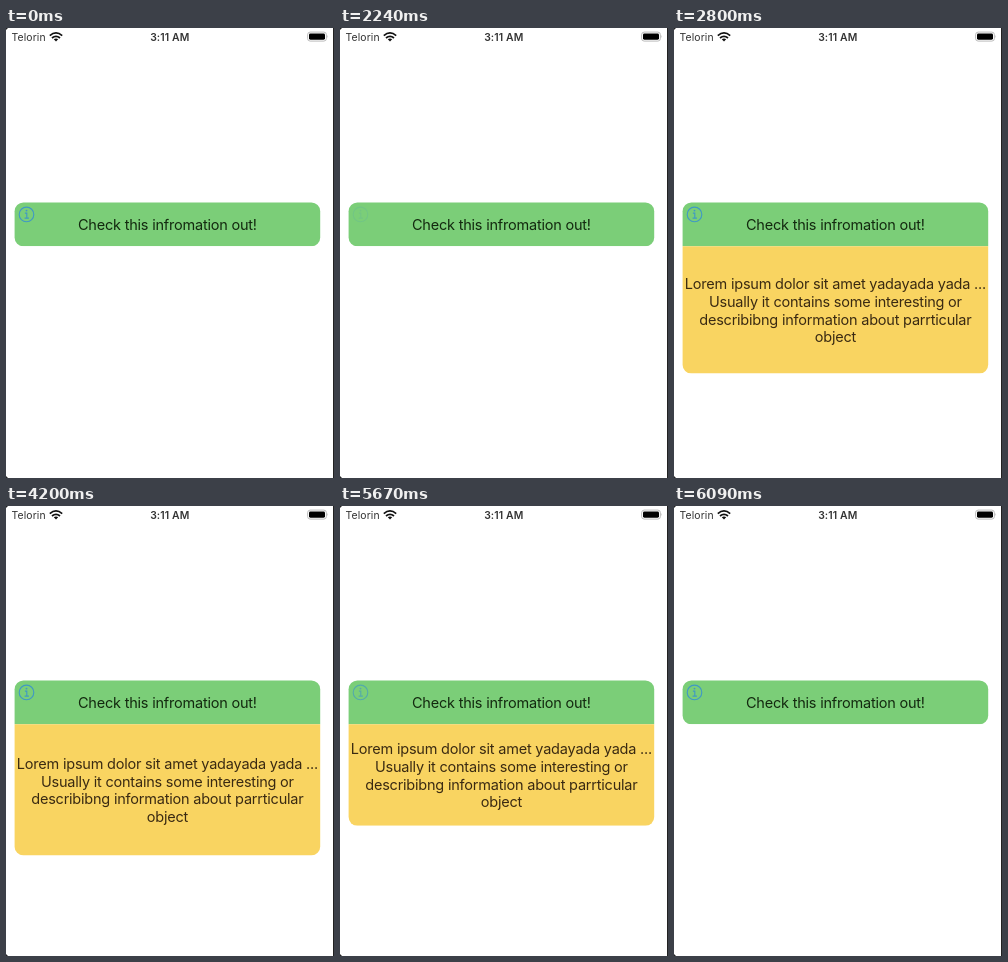
These frames come from a looping animation (328 by 450 pixels, 7.21 s). An HTML page:

```html
<!DOCTYPE html>
<html lang="en">
<head>
<meta charset="utf-8">
<title>Expandable info card</title>
<style>
  html, body { margin: 0; width: 100%; height: 100%; overflow: hidden; background: #fff; }
  svg { display: block; width: 328px; height: 450px; }
  text { font-family: Inter, "Noto Sans", sans-serif; }
  .copy { font-size: 14.5px; letter-spacing: -.21px; text-anchor: middle; fill: #13290f; }
  #details { fill: #3a2a12; }
  .status { font-size: 10.4px; letter-spacing: .12px; fill: #333; }
</style>
</head>
<body>
<svg viewBox="0 0 328 450">
  <defs>
    <clipPath id="cardClip"><rect id="cardShape" x="8.6" y="174.5" width="305.6" rx="8.75"/></clipPath>
    <clipPath id="panelClip"><rect id="panelShape" x="8" y="218.2" width="307"/></clipPath>
  </defs>

  <!-- screen edge -->
  <path d="M327.5 0V450" stroke="#222"/>
  <path d="M0 0h2L0 2zM0 450v-2l2 2z" fill="#222"/>

  <!-- status bar -->
  <text class="status" x="5.5" y="12.7">Telorin</text>
  <g fill="none" stroke="#111" stroke-width="1.7">
    <path d="M43.8 7.6Q50 2.2 56.2 7.6M46 10Q50 6.6 54 10"/>
    <path d="M47.8 11.3Q50 9.7 52.2 11.3L50 13.6z" fill="#111" stroke="none"/>
  </g>
  <text class="status" x="163.8" y="12.7" text-anchor="middle" font-weight="600">3:11 AM</text>
  <rect x="301.6" y="4.1" width="18.8" height="9" rx="2.6" fill="none" stroke="#b4b4b4" stroke-width=".9"/>
  <rect x="303" y="5.5" width="16" height="6.2" rx="1.4" fill="#000"/>
  <path d="M321.5 7.1q1.3 1.5 0 3z" fill="#b4b4b4"/>

  <!-- card -->
  <g clip-path="url(#cardClip)">
    <rect x="8" y="174" width="307" height="44.2" fill="#7bce78"/>
    <g clip-path="url(#panelClip)">
      <rect x="8" y="218" width="307" height="132" fill="#f9d461"/>
      <g id="details">
        <text class="copy" style="fill: inherit" x="161.4" y="-20.7">Lorem ipsum dolor sit amet yadayada yada ...</text>
        <text class="copy" style="fill: inherit" x="161.4" y="-3">Usually it contains some interesting or</text>
        <text class="copy" style="fill: inherit" x="161.4" y="14.7">describibng information about parrticular</text>
        <text class="copy" style="fill: inherit" x="161.4" y="32.4">object</text>
      </g>
    </g>
  </g>
  <text class="copy" x="161.4" y="202">Check this infromation out!</text>
  <g id="icon" fill="none" stroke="#4099c4" stroke-width="1.1">
    <circle cx="20.5" cy="186.4" r="7.3"/>
    <path d="M18.9 185.1h1.9v5M18.6 190.1h4.3"/>
    <circle cx="20.5" cy="182.6" r=".95" fill="#4099c4" stroke="none"/>
  </g>
</svg>
<script>
const LOOP = 7210, STEP = 70;
const HEADER_HEIGHT = 43.7, PANEL_TOP = 218.2, PANEL_HEIGHT = 131.2;
const OPEN = { press: 2240, start: 2400, duration: 456 };
const CLOSE = { press: 5320, start: 5486, duration: 560 };
const DIM = 0.15, FADE = 330;
const byId = id => document.getElementById(id);

// cubic-bezier(.42, 0, .58, 1), solved by bisection
function easeInOut(x) {
  if (x <= 0) return 0;
  if (x >= 1) return 1;
  let low = 0, high = 1;
  for (let i = 0; i < 20; i++) {
    const s = (low + high) / 2, r = 1 - s;
    if (1.26 * s * r * r + 1.74 * s * s * r + s ** 3 < x) low = s;
    else high = s;
  }
  return low * low * (3 - 2 * low);
}

const progress = (time, move) => easeInOut((time - move.start) / move.duration);

function iconOpacity(time) {
  const tap = time >= CLOSE.press ? CLOSE : OPEN;
  if (time < tap.press) return 1;
  return DIM + (1 - DIM) * easeInOut((time - tap.start) / FADE);
}

function draw(time) {
  const height = PANEL_HEIGHT * (progress(time, OPEN) - progress(time, CLOSE));
  byId('cardShape').setAttribute('height', HEADER_HEIGHT + height);
  byId('panelShape').setAttribute('height', height);
  byId('details').setAttribute('transform', `translate(0 ${PANEL_TOP + height / 2})`);
  byId('icon').setAttribute('opacity', iconOpacity(time));
}

function tick() {
  const time = performance.now() % LOOP;
  draw(Math.floor(time / STEP) * STEP);
  requestAnimationFrame(tick);
}
tick();
</script>
</body>
</html>
```
